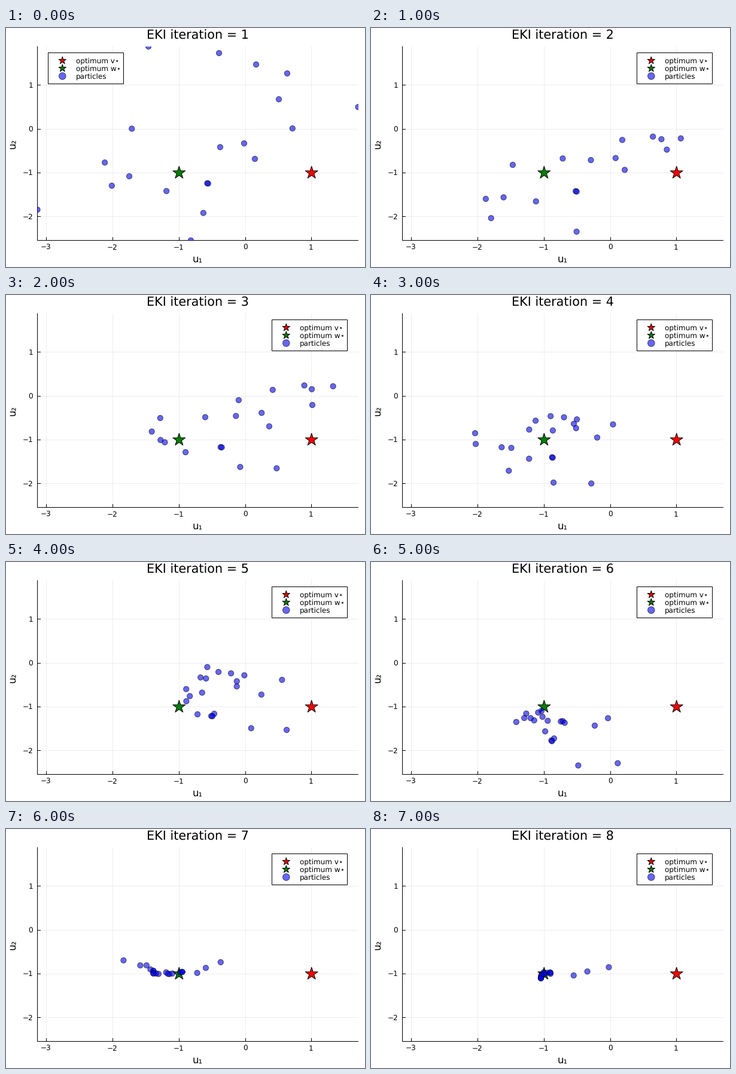
A matplotlib script that plays this animation: 600 px wide and 400 px high, repeating every 8 s.

```python
import numpy as np
import matplotlib.pyplot as plt
from matplotlib.animation import FuncAnimation
from matplotlib.patches import Rectangle

W, H, DPI = 600, 400, 100
PX = 72 / DPI                              # one pixel in points
LEFT, RIGHT, TOP, BOTTOM = 52.5, 588.5, 31, 355.5
X0, Y0, SX, SY = 400, 169, 110.7, 73.4     # data origin and scale in pixels
STEPS = 8
V, W_OPT = np.array([1, -1]), np.array([-1, -1])

plt.rcParams["font.family"] = "DejaVu Sans"
plt.rcParams["text.hinting"] = "none"

# The initial ensemble; everything after it follows from the update rule.
START = np.array([
    (-1.463, 1.880), (-0.397, 1.730), (0.163, 1.471), (0.632, 1.267),
    (0.506, 0.678), (1.703, 0.500), (0.712, 0.013), (-1.714, 0.007),
    (-2.122, -0.765), (-1.752, -1.078), (-2.016, -1.293), (-1.191, -1.415),
    (-0.380, -0.414), (-0.018, -0.328), (0.144, -0.682), (-0.634, -1.915),
    (-3.139, -1.840), (-0.822, -2.541), (-0.575, -1.238), (-0.562, -1.244)])


def loss(u):
    """Product of the distances to the two optima."""
    return np.linalg.norm(u - V, axis=1) * np.linalg.norm(u - W_OPT, axis=1)


def kalman_step(u):
    """Ensemble Kalman inversion towards zero loss."""
    g = loss(u)
    dg = g - g.mean()
    gain = dg @ (u - u.mean(axis=0)) / (dg @ dg + 1e-9)
    return u - np.outer(g, gain)


def to_pixels(u):
    return np.array([X0, Y0]) + np.asarray(u) * [SX, -SY]


swarms = [START]
while len(swarms) < STEPS:
    swarms.append(kalman_step(swarms[-1]))

fig = plt.figure(figsize=(W / DPI, H / DPI), dpi=DPI, facecolor="white")
ax = fig.add_axes([0, 0, 1, 1])
ax.set_xlim(0, W)
ax.set_ylim(H, 0)
ax.axis("off")


def crisp(v):
    return np.floor(v) + 0.5


def line(xs, ys, width=1, **kw):
    ax.plot(xs, ys, color="black", lw=width * PX, snap=False, **kw)


def label(x, y, s, size, ha="center", **kw):
    return ax.text(x, y, s, fontsize=size * PX, ha=ha, va="baseline", **kw)


def dots(points, marker, radius, color, **kw):
    points = np.atleast_2d(points)
    marks = ax.scatter(points[:, 0], points[:, 1], s=(2 * radius * PX) ** 2,
                       marker=marker, facecolor=color, edgecolor="black", **kw)
    marks.set_linewidth([PX, PX])   # two widths keep subpixel positions
    return marks


def minus(n):
    return str(n).replace("-", "\u2212")


for n in range(-3, 2):
    x = crisp(X0 + n * SX)
    line([x, x], [TOP, BOTTOM], 0.7, alpha=0.1)
    line([x, x], [BOTTOM, BOTTOM - 5], zorder=3)
    label(x - 0.5, 371, minus(n), 12)
for n in range(-2, 2):
    y = crisp(Y0 - n * SY)
    line([LEFT, RIGHT], [y, y], 0.7, alpha=0.1)
    line([LEFT, LEFT + 5], [y, y], zorder=3)
    label(45, y + 4, minus(n), 12, ha="right")
line([LEFT, LEFT, RIGHT], [TOP, BOTTOM, BOTTOM], zorder=3)

label(320.5, 392, "u\u2081", 16.5)
label(15.5, 193, "u\u2082", 16.5, rotation=90, rotation_mode="anchor")
title = label(320, 18.5, "", 20.8)

for spot, color in ((V, "red"), (W_OPT, "green")):
    dots(to_pixels(spot), "*", 11, color, zorder=4)

particles = dots(to_pixels(START), "o", 4.6, "blue", alpha=0.6, zorder=5)
particles.set_clip_path(Rectangle((LEFT - 0.5, TOP), RIGHT - LEFT + 0.5,
                                  BOTTOM - TOP + 0.5, transform=ax.transData))

box = Rectangle((0, 0), 126, 52, facecolor="white", edgecolor="black",
                linewidth=PX, zorder=6, snap=False)
ax.add_patch(box)
ENTRIES = [("*", 6.5, "red", 1, "optimum v\u22c6"),
           ("*", 6.5, "green", 1, "optimum w\u22c6"),
           ("o", 5.8, "blue", 0.6, "particles")]
keys = [(dots((0, 0), mark, r, color, alpha=alpha, zorder=7),
         label(0, 0, name, 12, ha="left", zorder=7))
        for mark, r, color, alpha, name in ENTRIES]


def place_legend(x, y):
    box.set_xy((x, y))
    for i, (key, text) in enumerate(keys):
        mid = y + 13 + 13 * i
        key.set_offsets([(x + 23.8, mid)])
        text.set_position((x + 46.5, mid + 4))


def draw(i):
    title.set_text(f"EKI iteration = {i + 1}")
    particles.set_offsets(to_pixels(swarms[i]))
    place_legend(70.5 if i == 0 else 444.5, 41.5)
    return []


anim = FuncAnimation(fig, draw, frames=STEPS, interval=1000,
                     init_func=lambda: draw(0), repeat=True, repeat_delay=0)
plt.show()
```
